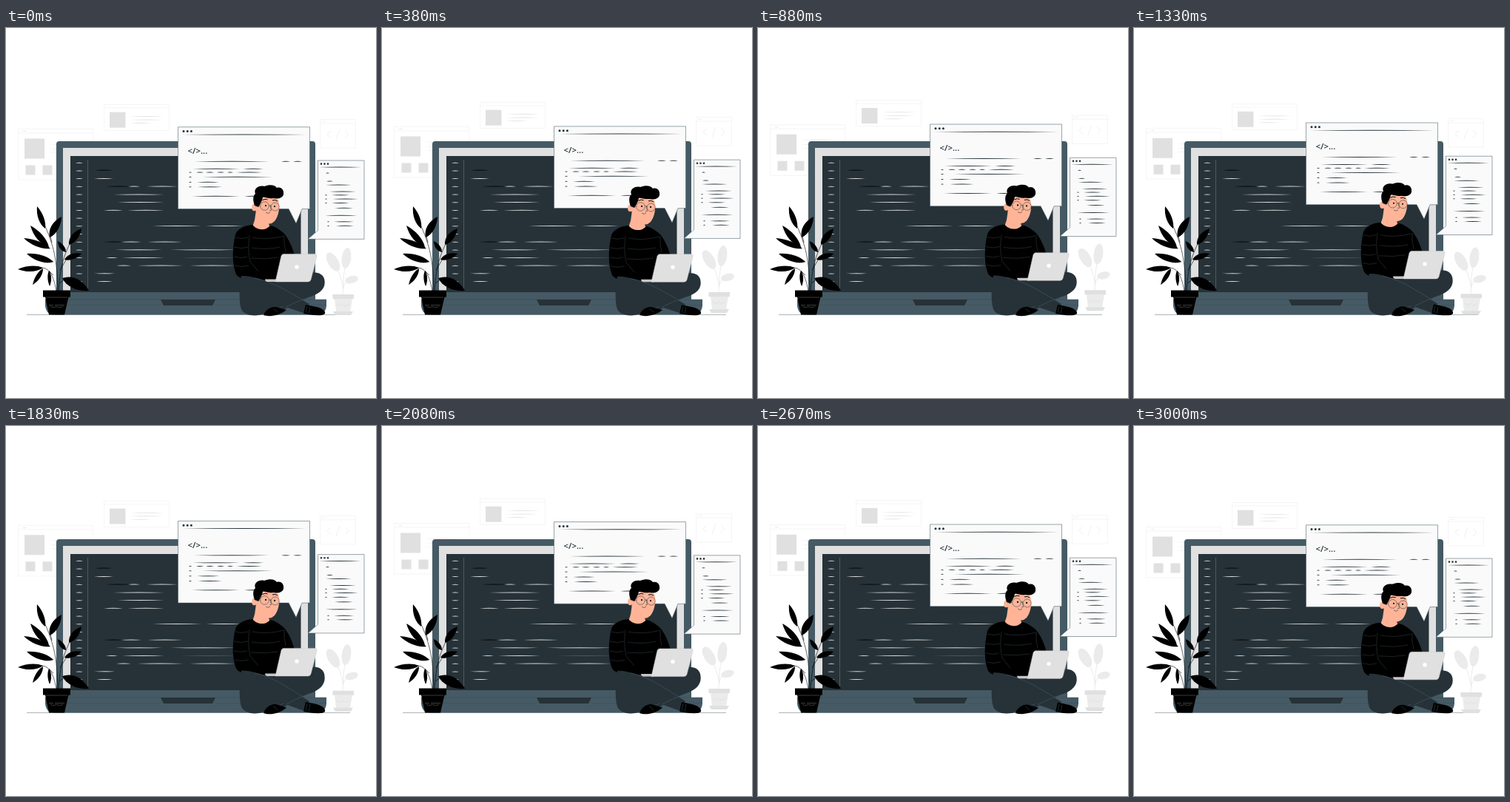
These frames come from a looping animation (500x500 px, 3.04 s). An HTML page:

```html
<!DOCTYPE html>
<html lang="en">
<head>
<meta charset="utf-8">
<title>Coding at a laptop</title>
<style>
html, body { margin: 0; width: 100%; height: 100%; overflow: hidden; background: #fff; }
svg { display: block; width: 100vw; height: 100vh; }
text { font: 600 11.4px "Open Sans", sans-serif; }
.dark { fill: #263238; }
.steel { fill: #455a64; }
.grey { fill: #e0e0e0; }
.pale { fill: #ebebeb; }
.line { fill: none; stroke-width: .6; }
.card { fill: #fff; stroke: #efefef; stroke-width: .6; }
.bubble { fill: #fafafa; stroke: #455a64; stroke-width: .55; }
</style>
</head>
<body>
<svg viewBox="0 0 500 500">
  <g class="back">
    <path class="card" d="M16.5 136.500H118V205H16.5ZM16.5 142H118"/>
    <path class="grey" d="M25 149.500h27v27h-27ZM26.500 185.500h13v13h-13ZM49.500 185.500h13v13h-13Z"/>
    <path class="ink" fill="#e4e4e4" d="M57 157h52M57 163h48M57 168h50M22 139.300h6"/>
    <path class="card" d="M132.500 103.500H220.500V138.500H132.500ZM132.500 108H220.500"/>
    <path class="grey" d="M140 113.700h21.500v21h-21.500Z"/>
    <path class="ink" fill="#e4e4e4" d="M167 119.500h47M167 124h45M167 128.500h30"/>
  </g>
  <g class="back">
    <path class="card" d="M424.500 123.500H472.500V162H424.500ZM424.500 129H472.500"/>
    <path class="line" stroke="#e6e6e6" d="M439 139l-5 5 5 5M458 139l5 5-5 5M451 137l-5 14M427 126.300h6"/>
  </g>

  <path class="line" stroke="#78868c" d="M28 387.500H465"/>

  <g id="laptop">
    <path class="steel" d="M68 367V157q0-4 4-4H414q4 0 4 4V367Z"/>
    <path class="grey" d="M77 162H408V357H77Z"/>
    <path class="dark" d="M87 173H398.500V357H87Z"/>
    <path class="line" stroke="#69777e" d="M110.500 178V352"/>
    <path class="ink" id="numbers" fill="#e0e0e0"/>
    <path class="ink" fill="#000" d="M120 192h24M135 214h35M132 289h28M120 331.800h14"/>
    <path class="ink" fill="#e0e0e0" d="M119 203.400h26M165 214h16M190 214h42M145 225h69M150 235.500h64M132 246.200h26M164 246.200h50M198 267.600h66M270 267.600h50M155 289h28M191 289h47M148 299.700h63M222 299.700h90M135 310.400h16M157 310.400h57M149 321.100h20M177 321.100h63M248 321.100h62M119 331.800h28M122 342.500h22"/>
    <path class="ink" fill="#455a64" d="M236 310.400h80"/>
    <path class="steel" d="M53 367H433V375Q432 387.500 420 387.500H66Q54 387.500 53 375Z"/>
    <path class="line" stroke="#3c5059" d="M53 367H433M53 374.500H209M283 374.500H433"/>
    <path class="dark" d="M209 367H283L279 375H213Z"/>
  </g>

  <g id="plant">
    <path class="line" stroke="#000" d="M70 356C69 320 67 300 53 268M71 356C73 325 77 310 87 290M68 356C65 338 60 325 49 324M64 334L58 328M62 290L60 281M64 316L60 314M73 327L82 312M72 345L82 338"/>
    <g id="leaves"></g>
    <path d="M50 354.500H87V363.500H84.500L79 387.500H58L53 363.500H50Z"/>
    <path class="line" stroke="#666" d="M54 364H83M58 374.500H64M66 374.500H79M60 376.500q4 2 8 0q4 2 9 0"/>
  </g>

  <g class="back">
    <path class="line" stroke="#dedede" d="M455 361Q455 335 460 311M456 352Q452 330 441 313M456 350Q458 342 466 340"/>
    <g class="pale">
      <ellipse rx="7" ry="14" transform="translate(442 316) rotate(-30)"/>
      <ellipse rx="6.300" ry="14" transform="translate(460 311) rotate(7)"/>
      <ellipse rx="9" ry="5" transform="translate(467 340) rotate(-14)"/>
      <path d="M444 366H468L465 383.500H446Z"/>
    </g>
    <path class="grey" d="M441.500 360H470V366H441.500ZM442 383H469L466 388H445Z"/>
    <path class="line" stroke="#d8d8d8" d="M447 373l4 3 4-3 4 3 5-3"/>
  </g>

  <g class="float">
    <path class="bubble" d="M232.500 133.800H410.500V244.500H400L392 264L382 244.500H232.500Z"/>
    <path class="dark" id="bigDots"/>
    <path class="ink" fill="#263238" d="M238 144h168"/>
    <text class="dark" x="245.500" y="170">&lt;/&gt;...</text>
    <path class="ink" fill="#263238" d="M254 180.200h102M372 180.200h12M388 180.200h12M252 190.200h64M320 190.200h28M247 195h4M257 195h10M270 195h11M285 195h10M299 195h8M311 195h35M247 201.200h4M265 201.200h95M247 208.200h4M258 208.200h30M247 214.800h4M259 214.800h33M251 227.200h65M322 227.200h22"/>
  </g>
  <g class="float">
    <path class="bubble" d="M421.500 179H484V285.300H408L421.500 273.500Z"/>
    <path class="dark" id="smallDots"/>
    <path class="ink" fill="#263238" d="M423 188h57"/>
    <path class="ink" fill="#263238" d="M432 196h5M433 207h9M432 212h35M437 221h36M431 225.700h3M440 225.700h24M431 231h3M441 231h35M431 236.600h3M440 236.600h24M444 243.200h25M431 253.200h44M434 261.700h3M443 261.700h27M434 267.200h3M446 267.200h24"/>
  </g>

  <g id="man">
    <g id="torso">
      <path fill="#ffb497" d="M338 236C347 226 364 227 368.500 233C370 243 369 253 363 261Q359 265 355 264.500L357 270C350 277 338 276 333 269Q337 259 337.500 249Z"/>
      <ellipse cx="335.500" cy="242.500" rx="3.400" ry="4.700" fill="#ffb497"/>
      <path d="M333 266C322 267 313 271 310 279C306 296 305 318 311 333C317 341 332 342 350 341H370L374 306H389.500C387 296 382 285 376 278C370 272 363 268 357 267C350 275 339 273 333 266Z"/>
      <path class="line" stroke="#30393d" d="M310 283Q318 286 327 283M333 283Q352 287 376 281M308 296Q318 299 327 296M332 297Q353 300 370 296M308 309Q318 312 326 309M331 311Q350 313 367 310M309 321Q318 324 328 321M329 280Q326 300 330 316L341 329M376 281Q375 292 378 302"/>
      <path d="M336 240C333 232 334 226 337 224C334 217 342 212 349 214C356 211 364 212 366 216C372 214 376 219 375 225C373 231 366 231 361 230C355 231 350 228 347 229C346 234 344 237 341 242Z"/>
      <path class="line" stroke="#263238" d="M343.500 240.500H338M355.700 240.500Q357 239 358 241M351 249q3 3 6 0M357 239l1.500 7.500-2.500 .5"/>
      <path class="line" stroke="#000" style="stroke-width:1" d="M346.500 232.500q4-2.300 7-.5M360 233q4-1.500 7 1"/>
      <g class="line" stroke="#37474f">
        <circle cx="349.500" cy="240.500" r="5.800"/>
        <circle cx="363.700" cy="241.500" r="5.500"/>
      </g>
      <circle cx="351" cy="240" r="1.100"/>
      <circle cx="363" cy="241" r="1.100"/>
    </g>
    <g id="legs" class="dark">
      <path d="M352 342L398 337C410 327 429 328 430.500 341C432 351 426 358 412 363C395 369 378 379 364 387L346 378Z"/>
      <path d="M318 335C330 334 346 340 362 345L410 373L402 385L375 376L352 385C338 391 322 389 318 380C314 368 316 345 318 335Z"/>
      <path class="line" stroke="#455a64" d="M336 338C352 341 365 347 381 356L409 372M375 376L352 385M378 377Q394 369 412 363"/>
      <path fill="#000" d="M348 388C350 381 358 376 365 377L379 381C371 388 357 391 348 388Z"/>
      <path fill="#000" d="M405 374L420 377C428 379 432 383 431 386C428 390 412 388 402 386Z"/>
      <path class="line" stroke="#37474f" d="M361 379l6 5M407 376l-2 9M411 377l-2 9"/>
    </g>
    <g id="notebook">
      <path fill="#c7c7c7" d="M350 339.500H367V343H353Q350 342 350 339.500Z"/>
      <path class="grey" stroke="#cfcfcf" stroke-width=".5" d="M375 305.500H418Q421 305.500 420 309L412 340Q411 343 408 343H364L372 308Q373 305.500 375 305.500Z"/>
      <circle cx="393" cy="323" r="2.700" fill="#fff"/>
    </g>
  </g>
</svg>
<script>
const LOOP = 3040;
const $ = s => document.querySelector(s);
const $$ = s => document.querySelectorAll(s);

const range = n => [...Array(n).keys()];
$('#numbers').setAttribute('d', range(16).map(i => `M94 ${182.2 + i * 10.7}h10`).join(''));

// Turn each straight dash into a stroke that tapers at both ends
$$('.ink').forEach(el => {
  const d = el.getAttribute('d').replace(/M([\d.]+) ([\d.]+)h([\d.]+)/g,
    (_, x, y, w) => `M${x} ${y}q${w / 2} -1 ${w} 0q${-w / 2} 1 ${-w} 0Z`);
  el.setAttribute('d', d);
});

function dots(id, x, y, r, step) {
  $(id).setAttribute('d', range(3).map(i =>
    `M${x + i * step - r} ${y}a${r} ${r} 0 1 0 ${2 * r} 0a${r} ${r} 0 1 0 ${-2 * r} 0`).join(''));
}
dots('#bigDots', 240, 139.6, 1.5, 5.2);
dots('#smallDots', 426, 183.6, 1.3, 4.5);

// Each leaf: base x, base y, tip x, tip y, half width
const leaves = [
  [53, 271, 42, 241, 5.5], [59, 283, 75, 255, 7.5], [58, 296, 33, 267, 6.5],
  [60, 298, 24, 284, 5.5], [64, 316, 28, 305, 6.5], [50, 324, 16, 326, 5.5],
  [50, 325, 36, 347, 4.5], [58, 328, 59, 349, 3.5], [85, 293, 102, 271, 6.5],
  [81, 303, 70, 288, 4.5], [79, 313, 102, 305, 5.5], [76, 338, 112, 355, 10]
];
$('#leaves').innerHTML = leaves.map(([x, y, tx, ty, w]) => {
  const len = Math.hypot(tx - x, ty - y);
  const angle = Math.atan2(ty - y, tx - x) * 180 / Math.PI;
  return `<path transform="translate(${x} ${y}) rotate(${angle})"
    d="M0 0C${len * .25} ${-w} ${len * .65} ${-w} ${len} 0C${len * .65} ${w * .8} ${len * .25} ${w * .8} 0 0Z"/>`;
}).join('');

const wave = (t, period, lag = 0) => Math.cos(2 * Math.PI * (t - lag) / period);
const shift = (el, y) => el.setAttribute('transform', `translate(0 ${y})`);

function draw(now) {
  const t = now % LOOP;
  const back = 3 * (wave(t, LOOP / 2) - 1);
  const float = 3 * (wave(t, LOOP) - 1);
  const body = 3 * wave(t, LOOP, 380) - 2.1;
  $$('.back').forEach(el => shift(el, back));
  $$('.float').forEach(el => shift(el, float));
  shift($('#torso'), body);
  shift($('#notebook'), 2.7 * (wave(t, LOOP, 250) - .9));
  $('#legs').setAttribute('transform', `translate(0 388) scale(1 ${1 - body / 62}) translate(0 -388)`);
  requestAnimationFrame(draw);
}
draw(0);
</script>
</body>
</html>
```
